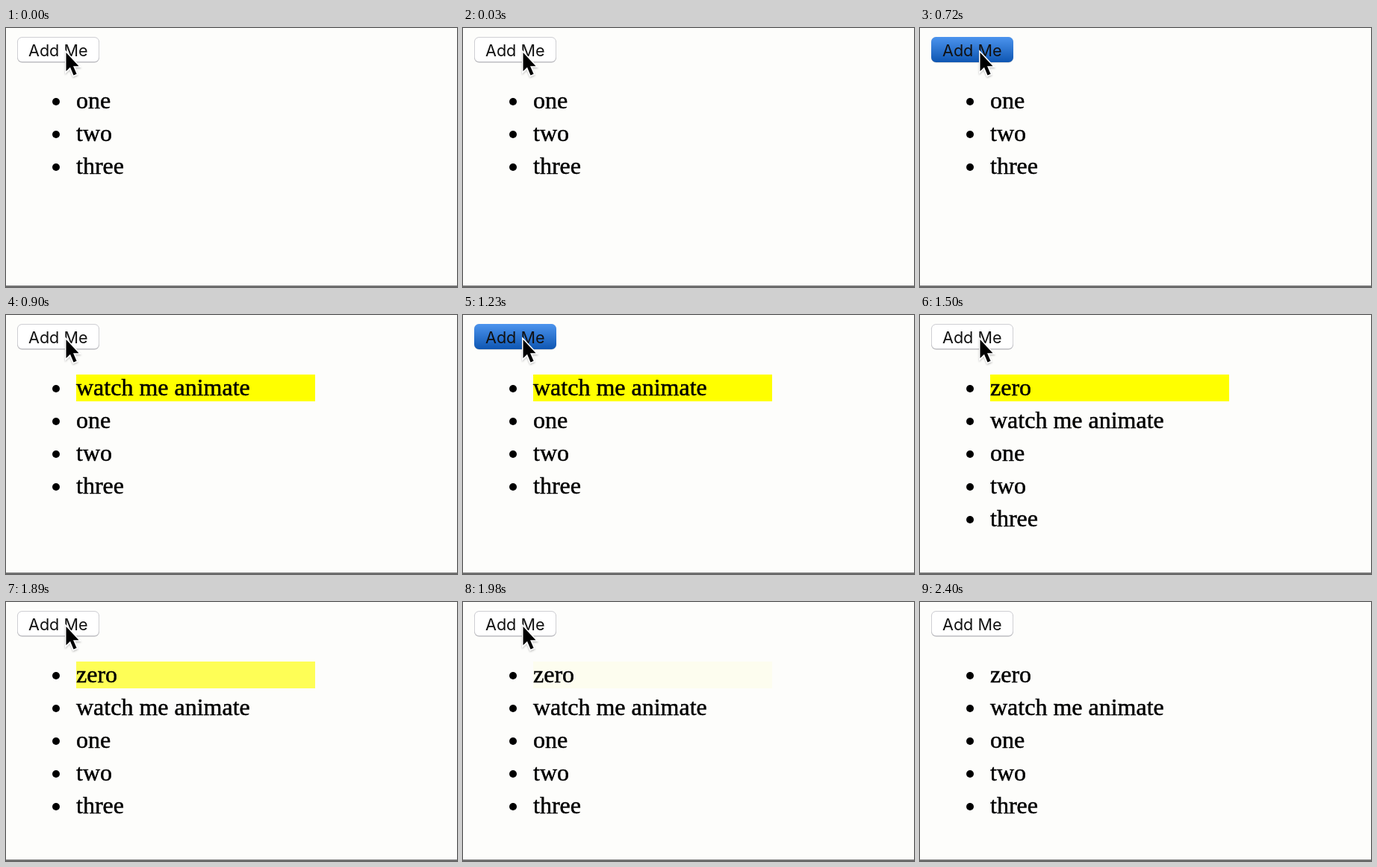
Write an HTML page that moves like this. It is 604x348 px and loops after 2460 ms.

```html
<!DOCTYPE html>
<html lang="en">
<head>
<meta charset="utf-8">
<title>Animated list</title>
<style>
  html, body { margin: 0; width: 100%; height: 100%; overflow: hidden; background: #fdfdfb; }
  svg { display: block; width: 604px; height: 348px; }
  .item { font: 32px "Liberation Serif", Times, serif; stroke: #000; stroke-width: .5px; }
  .label { font: 21.6px Inter, sans-serif; }
</style>
</head>
<body>
<svg id="stage" viewBox="0 0 604 348">
  <defs>
    <linearGradient id="blue" x2="0" y2="1">
      <stop stop-color="#4c94ee"/>
      <stop offset="1" stop-color="#0e56b2"/>
    </linearGradient>
    <filter id="shadow" x="-50%" y="-50%" width="200%" height="200%">
      <feDropShadow dx="0" dy="1.5" stdDeviation="1.2" flood-opacity=".25"/>
    </filter>
  </defs>
  <rect width="604" height="348" fill="#fdfdfb"/>
  <rect y="346" width="604" height="2" fill="#747474"/>
  <g id="list"></g>
  <rect x="15" y="13" width="110" height="33.5" rx="6.5" fill="#b4b4b8"/>
  <rect x="15" y="12" width="110" height="33.5" rx="6.5" fill="#cfcfd4"/>
  <rect x="16" y="13" width="108" height="32" rx="5.5" fill="#fff"/>
  <rect id="pressed" x="15" y="12" width="110" height="34" rx="6.5" fill="url(#blue)"/>
  <text class="label" x="30" y="38" fill="#111">Add Me</text>
  <path id="cursor" d="M80.5 33V58L86 52.8L90.5 63.5L94.6 61.8L90 51.2H97.5Z"
    stroke="#fff" stroke-width="3" paint-order="stroke" filter="url(#shadow)"/>
</svg>
<script>
const LOOP = 2460, TICK = 30, ROW = 44;
const byId = id => document.getElementById(id);
const clamp = v => Math.min(1, Math.max(0, v));
const ramp = (t, start, length) => clamp((t - start) / length);

const clicks = [{ down: 720, up: 840 }, { down: 1200, up: 1320 }];
const items = [
  { text: "zero", added: 1320, fade: 1860 },
  { text: "watch me animate", added: 840, fade: 1350 },
  { text: "one" }, { text: "two" }, { text: "three" }
];

function add(parent, tag, attrs, text = "") {
  const node = document.createElementNS("http://www.w3.org/2000/svg", tag);
  for (const key in attrs) node.setAttribute(key, attrs[key]);
  node.textContent = text;
  return parent.appendChild(node);
}

for (const item of items) {
  item.row = add(byId("list"), "g", {});
  item.glow = add(item.row, "rect", { x: 94, y: 80, width: 320, height: 36, fill: "#ff0" });
  add(item.row, "circle", { cx: 67, cy: 99, r: 5 });
  add(item.row, "text", { class: "item", x: 94, y: 108 }, item.text);
}

function pressure(t, { down, up }) {
  return t < down ? 0 : 1 - ramp(t, up - TICK, 60);
}

function render(t) {
  let index = 0;
  for (const { row, glow, added = 0, fade } of items) {
    const shown = t >= added;
    row.setAttribute("visibility", shown ? "visible" : "hidden");
    row.setAttribute("transform", `translate(0 ${index * ROW})`);
    glow.setAttribute("opacity", fade ? (1 - ramp(t, fade, 150)) ** 1.9 : 0);
    if (shown) index++;
  }
  byId("pressed").setAttribute("opacity", Math.max(...clicks.map(c => pressure(t, c))));
  byId("cursor").setAttribute("opacity", 1 - ramp(t, 2130, 120));
}

const start = performance.now();
function frame() {
  const t = (performance.now() - start) % LOOP;
  render(Math.floor(t / TICK) * TICK);
  requestAnimationFrame(frame);
}
render(0);
requestAnimationFrame(frame);
</script>
</body>
</html>
```
